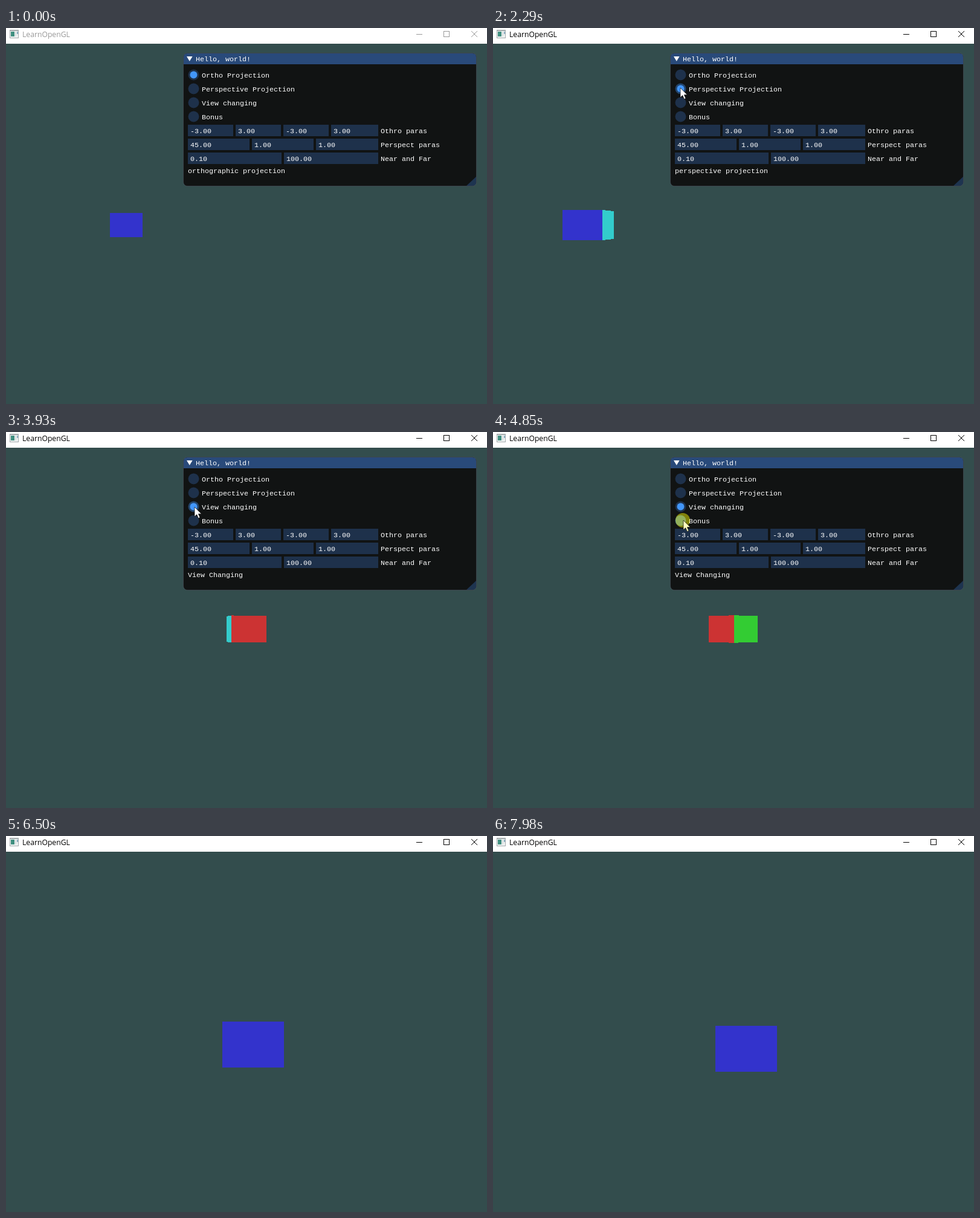
Recreate the animation shown at these times as an HTML page. Size 796 by 622 pixels, loop 8000 ms.

```html
<!DOCTYPE html>
<html lang="en">
<head>
<meta charset="utf-8">
<title>LearnOpenGL</title>
<style>
  html, body { margin: 0; width: 100%; height: 100%; overflow: hidden; background: #334d4d; }
  svg { display: block; width: 796px; height: 622px; }
  .mono { font: 11.667px "Liberation Mono", monospace; fill: #fff; white-space: pre; }
  #title { font: 12.2px "Open Sans", "Noto Sans", sans-serif; }
  #scene, .crisp { shape-rendering: crispEdges; }
</style>
</head>
<body>
<svg viewBox="0 0 796 622">
  <rect width="796" height="622" fill="#334d4d"/>
  <g id="scene"></g>

  <rect width="796" height="26" fill="#fff"/>
  <g class="crisp">
    <rect x="6" y="3" width="15" height="14" fill="#a3abad"/>
    <rect x="7" y="5" width="13" height="11" fill="#f0f3f3"/>
    <rect x="8" y="6" width="6" height="8" fill="#3f8f80"/>
    <rect x="15" y="6" width="2" height="8" fill="#d5dddd"/>
    <rect x="18" y="6" width="2" height="4" fill="#8fb0c4"/>
  </g>
  <text id="title" x="27" y="15">LearnOpenGL</text>
  <g id="buttons" fill="none">
    <path class="crisp" d="M679 10.5H689M724.5 5.5H733.5V14.5H724.5Z"/>
    <path d="M770 5L780 15M780 5L770 15"/>
  </g>

  <g id="panel">
    <rect x="293.5" y="41.5" width="485" height="220" rx="6.5" fill="#111313"/>
    <path d="M294 60V48Q294 42 300 42H772Q778 42 778 48V60Z" fill="#294a7a"/>
    <path d="M778 246V255Q778 261 772 261H762Z" fill="#1e3450"/>
    <rect x="293.5" y="41.5" width="485" height="220" rx="6.5" fill="none" stroke="#6e6e80" stroke-opacity=".35"/>
    <path d="M299 47H308.6L303.8 55Z" fill="#fff"/>
    <text class="mono" x="314" y="55">Hello, world!</text>
    <g id="widgets"></g>
    <text class="mono" id="status" x="301" y="240"></text>
  </g>

  <circle id="press" r="12" fill="#ff0" fill-opacity=".47"/>
  <path id="cursor" d="M0 0V16L3.7 12.6L6.4 18.6L9 17.5L6.4 11.6H11.5Z" stroke="#111" stroke-width=".7"/>
</svg>

<script>
const LOOP = 8000;
const [BLUE, CYAN, RED, GREEN] = ["#3333cc", "#33cccc", "#cc3333", "#33cc33"];
const MODES = ["Ortho Projection", "Perspective Projection", "View changing", "Bonus"];
const STATUS = ["orthographic projection", "perspective projection", "View Changing", ""];

// A mode takes over when its click is released
const RELEASES = [2220, 3640, 4940];
const CLICK = 150;
const FOCUS = RELEASES[0] - CLICK;

// Legs: departure, arrival, destination
const POINTER = { from: [477, 424], legs: [
  [900, 1500, 326, 108], [1500, 1910, 310, 99], [2530, 3150, 326, 136],
  [3150, 3490, 312, 124], [4160, 4790, 315, 146]
] };
const BONUS = { from: [346, 290], legs: [
  [5400, 5560, 351, 297], [5860, 6290, 358, 307], [6500, 6890, 357, 326],
  [6990, 7500, 375, 339], [7500, 7980, 368, 314]
] };

const $ = id => document.getElementById(id);
const show = (node, on) => node.style.display = on ? "" : "none";
const easeOut = k => 1 - (1 - k) ** 2;

function travel({ from, legs }, t) {
  let [x, y] = from;
  for (const [start, end, toX, toY] of legs) {
    const k = easeOut(Math.max(0, Math.min(1, (t - start) / (end - start))));
    x += (toX - x) * k;
    y += (toY - y) * k;
  }
  return [Math.round(x), Math.round(y)];
}

const text = (x, y, s) => `<text class="mono" x="${x}" y="${y}">${s}</text>`;
const rect = (x, y, w, h, fill) =>
  `<rect class="crisp" x="${x}" y="${y}" width="${w}" height="${h}" fill="${fill}"/>`;
const poly = (points, fill) => `<polygon points="${points.join(" ")}" fill="${fill}"/>`;

function radio(label, i) {
  const y = 77.5 + 23 * i;
  return `<circle class="ring" cx="310.5" cy="${y}" r="9"/>` +
    `<circle class="dot" cx="310.5" cy="${y}" r="6" fill="#4296fa"/>` + text(324, y + 4.5, label);
}

// Fields share 315 px with 4 px gaps; the last one takes the remainder
function inputRow(y, label, values) {
  const pitch = Math.floor((315 + 4) / values.length);
  return values.map((value, i) => {
    const x = 301 + pitch * i;
    const width = i === values.length - 1 ? 616 - x : pitch - 4;
    return rect(x, y, width, 19, "#1e314b") + text(x + 4, y + 14, value);
  }).join("") + text(620, y + 14, label);
}

// Cube of half size 0.3 seen by a camera circling it at distance 10, 45 degree view
function orbitCube(angle) {
  const focal = 1 / Math.tan(Math.PI / 8), radius = 0.3 * Math.SQRT2;
  return [BLUE, CYAN, RED, GREEN].map((fill, i) => {
    const facing = i * Math.PI / 2 - angle;
    if (Math.cos(facing) < 0.03) return "";
    const edge = turn => {
      const a = facing + turn, scale = focal / (10 - radius * Math.cos(a));
      return [397.5 + 398 * scale * radius * Math.sin(a), 300 * scale * 0.3];
    };
    const [x0, h0] = edge(-Math.PI / 4), [x1, h1] = edge(Math.PI / 4);
    return poly([[x0, 326 - h0], [x1, 326 - h1], [x1, 326 + h1], [x0, 326 + h0]], fill);
  }).join("");
}

const SCENES = [
  () => rect(172, 306, 54, 40, BLUE),
  () => rect(115, 301, 66, 50, BLUE) + poly([[181, 301], [200, 303], [200, 349], [181, 351]], CYAN),
  t => orbitCube(3.9 + (t - 4850) / 1000),
  t => rect(...travel(BONUS, t), 102, 76, BLUE)
];

function draw(t) {
  const mode = RELEASES.filter(release => t >= release).length;
  const focused = t >= FOCUS;
  const panelOpen = mode < 3;
  const pressed = panelOpen && t >= RELEASES[mode] - CLICK;
  const [x, y] = travel(POINTER, t);
  const hovered = focused && (y - 68) % 23 < 19 ? Math.floor((y - 68) / 23) : -1;

  $("scene").innerHTML = SCENES[mode](t);
  $("title").setAttribute("fill", focused ? "#000" : "#999");
  $("buttons").setAttribute("stroke", focused ? "#000" : "#999");
  $("status").textContent = STATUS[mode];
  show($("panel"), panelOpen);
  document.querySelectorAll(".ring").forEach((ring, i) =>
    ring.setAttribute("fill", i !== hovered ? "#1e314b" : pressed ? "#326aad" : "#24466e"));
  document.querySelectorAll(".dot").forEach((dot, i) => show(dot, i === mode));

  show($("press"), pressed);
  $("press").setAttribute("transform", `translate(${x - 1} ${y})`);
  show($("cursor"), panelOpen && t >= 900);
  $("cursor").setAttribute("fill", pressed ? "#ffffc0" : "#fff");
  $("cursor").setAttribute("transform", `translate(${x} ${y})`);
}

$("widgets").innerHTML = MODES.map(radio).join("") +
  inputRow(160, "Othro paras", ["-3.00", "3.00", "-3.00", "3.00"]) +
  inputRow(183, "Perspect paras", ["45.00", "1.00", "1.00"]) +
  inputRow(206, "Near and Far", ["0.10", "100.00"]);

const began = performance.now();
function tick() {
  draw((performance.now() - began) % LOOP);
  requestAnimationFrame(tick);
}
tick();
</script>
</body>
</html>
```
